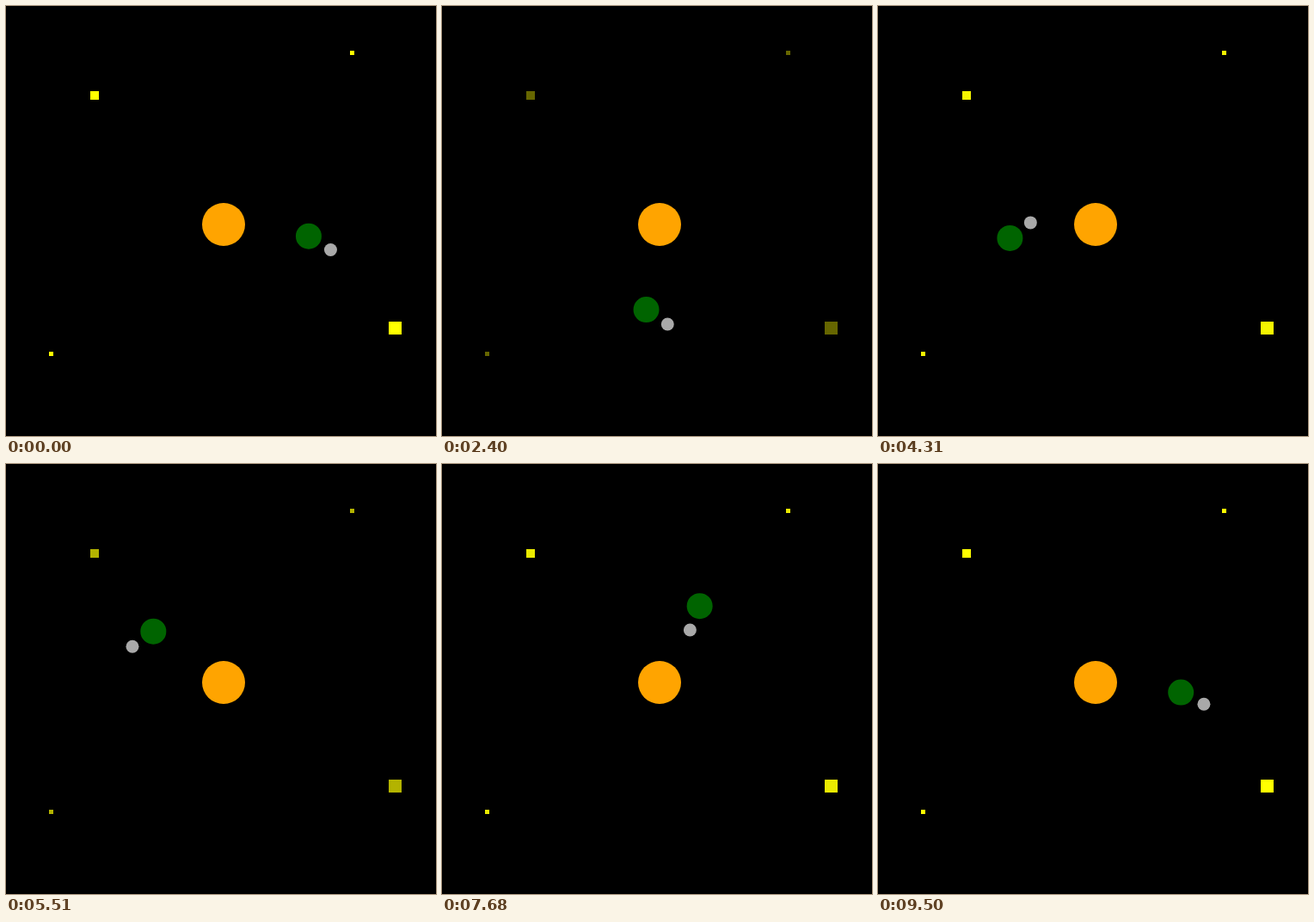
Animation, 500 px wide and 500 px high, one loop 9600 ms. Source, as an HTML page:

```html
<!DOCTYPE html>
<html lang="en">
<head>
<meta charset="utf-8">
<title>Orbit</title>
<style>
  html, body { margin: 0; width: 100%; height: 100%; overflow: hidden; background: #000; }
  svg { display: block; width: 500px; height: 500px; }
</style>
</head>
<body>
<svg viewBox="0 0 500 500">
  <g id="stars" fill="#ff0">
    <rect x="98" y="99" width="10" height="10"/>
    <rect x="400" y="52" width="5" height="5"/>
    <rect x="445" y="367" width="15" height="15"/>
    <rect x="50" y="402" width="5" height="5"/>
  </g>
  <circle cx="253" cy="254" r="25" fill="#ffa400"/>
  <circle id="planet" r="15" fill="#006400"/>
  <circle id="moon" r="7.5" fill="#a9a9a9"/>
</svg>
<script>
const LOOP = 9600;
const CENTER = { x: 252.5, y: 253.8 };
const PLANET_ORBIT = 100.4;
const MOON_ORBIT = 30;
const MOON_TURNS = 4; // moon turns per planet turn

// Planet angle in degrees, speed in degrees per ms
const START_ANGLE = 7.9;
const SPEED = 0.03777;

// Stars jump to a new brightness at a fixed interval
const TWINKLE_START = 300;
const TWINKLE_STEP = 1430;
const TWINKLE = [1, 0.65, 0.4, 0.96, 0.7, 0.51, 0.92, 1];

const [stars, planet, moon] = ["stars", "planet", "moon"].map(id => document.getElementById(id));

function orbit(center, radius, angle) {
  return { x: center.x + radius * Math.cos(angle), y: center.y + radius * Math.sin(angle) };
}

function place(circle, { x, y }) {
  circle.setAttribute("cx", x.toFixed(2));
  circle.setAttribute("cy", y.toFixed(2));
}

function draw(t) {
  const angle = (START_ANGLE + SPEED * t) * Math.PI / 180;
  const planetPos = orbit(CENTER, PLANET_ORBIT, angle);
  place(planet, planetPos);
  place(moon, orbit(planetPos, MOON_ORBIT, angle * MOON_TURNS));
  const level = Math.floor((t - TWINKLE_START) / TWINKLE_STEP) + 1;
  stars.setAttribute("opacity", TWINKLE[level]);
}

const start = performance.now();
function frame() {
  draw((performance.now() - start) % LOOP);
  requestAnimationFrame(frame);
}
frame();
</script>
</body>
</html>
```
